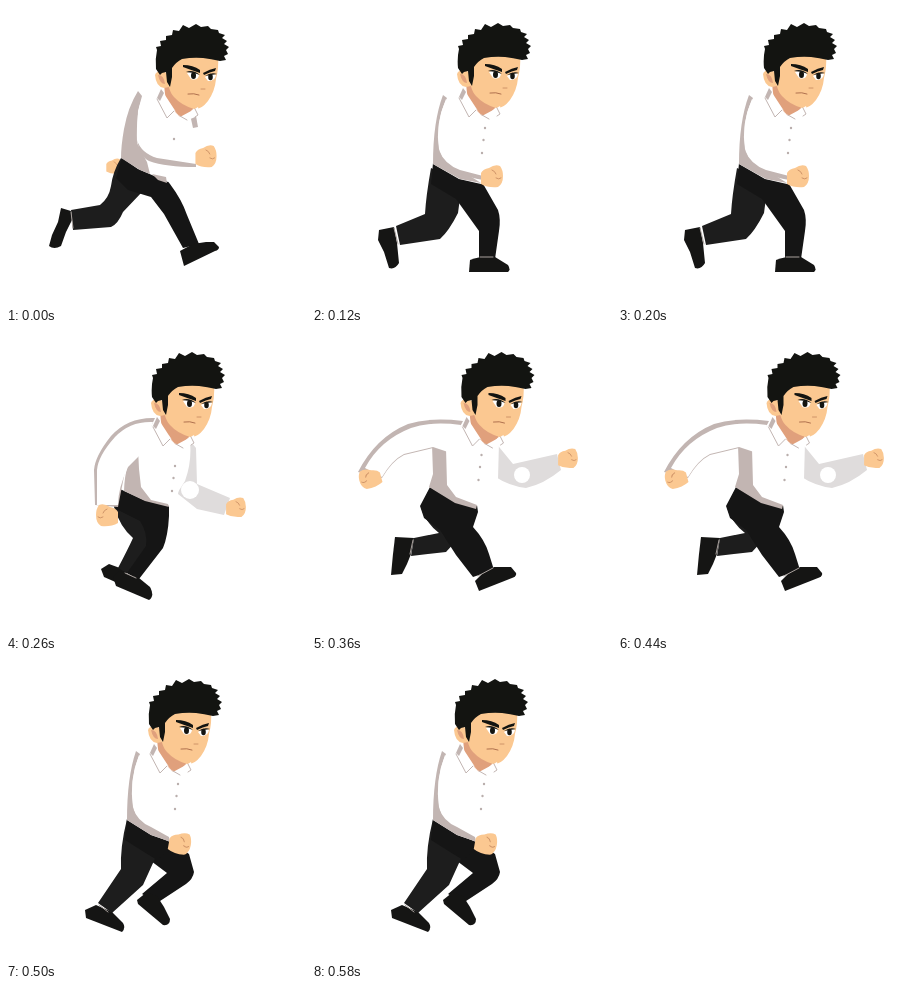
An HTML page that plays this animation: 300 px wide and 300 px high, repeating every 0.64 s.

```html
<!DOCTYPE html>
<html lang="en">
<head>
<meta charset="utf-8">
<title>Running man</title>
<style>
  html, body { margin: 0; width: 100%; height: 100%; overflow: hidden; background: #fff; }
  #strip { display: block; width: 1500px; height: 300px; animation: run 640ms step-end infinite; }
  @keyframes run {
    0% { transform: translateX(0); }
    18.75% { transform: translateX(-300px); }
    40.625% { transform: translateX(-600px); }
    56.25% { transform: translateX(-900px); }
    78.125% { transform: translateX(-1200px); }
  }
  .skin { fill: #fbc891; }
  .tan { fill: #e0a07c; }
  .hair { fill: #131411; }
  .shirt { fill: #fff; }
  .shade { fill: #c2b5b2; }
  .sleeve { fill: #dfdcdc; }
  .leg { fill: #151515; }
  .far { fill: #1d1d1d; }
  .shoe { fill: #151514; }
  .cuff { stroke: #a9a19d; }
  .line { stroke: #cf9468; }
  .fold { stroke: #c2b5b2; }
  .cuff, .line, .fold { fill: none; stroke-width: 1; stroke-linecap: round; }
</style>
</head>
<body>
<svg id="strip" viewBox="0 0 1500 300">
  <defs>
    <g id="head">
      <path class="tan" d="M154 78L156 95L170 110Q178 108 183 102L178 88Z"/>
      <path class="skin" d="M157 62L164 46L208 49Q209 61 206 72Q205 84 198 94Q191 103 184 102Q171 98 164 90Q157 83 157 62Z"/>
      <path class="tan" d="M158 80Q160 90 168 96Q176 101 184 102L174 103Q160 95 158 80Z"/>
      <path class="skin" d="M157 66Q148 61 145 68Q146 80 154 81L159 80Z"/>
      <path class="tan" d="M148 68Q154 68 155 77Q150 77 148 68Z"/>
      <path class="hair" d="M150 68L146 62Q145 52 147 43L146 40L151 39L150 34L156 33L156 29L162 28L163 23L169 24L173 18L179 21L186 17L191 20L198 19L201 22L208 23L209 26L215 28L212 31L217 34L214 37L219 40L216 43L218 47L214 49L216 53L210 54Q201 52 193 51Q183 50 172 52Q166 55 162 61L162 70L160 80L157 75L156 65L152 66Z"/>
      <path class="hair" d="M173 58Q183 58 190 63L190 66Q181 63 173 60ZM193 66Q200 62 206 61L205 64Q200 65 194 68Z"/>
      <path fill="#fff" d="M177 66Q184 62 189 68Q188 74 181 72ZM195 70Q201 65 206 68Q205 74 198 74Z"/>
      <path class="hair" d="M176 65Q183 62 190 68L184 66ZM195 69Q201 65 207 67L201 68Z"/>
      <ellipse class="hair" cx="183.500" cy="68.500" rx="2.500" ry="3.500"/>
      <ellipse class="hair" cx="200.500" cy="70" rx="2.300" ry="3.300"/>
      <path class="line" d="M191 82L195 82"/>
      <path class="line" d="M178 87Q184 86 189 88" style="stroke:#b0714e"/>
    </g>
    <g id="collar">
      <path class="shirt" d="M151 82L146 90L158 112L165 104L170 110L183 103L188 100L190 108L178 113L168 108Z"/>
      <path class="fold" d="M147 92L157 111L164 104M170 109L177 113M185 102L188 108L185 110"/>
      <path class="shade" d="M151 82L147 91L150 94L154 86Z"/>
    </g>
    <g id="buttons" fill="#b9aeac">
      <circle cx="173" cy="122" r="1.200"/>
      <circle cx="171.500" cy="134" r="1.200"/>
      <circle cx="170" cy="147" r="1.200"/>
    </g>
    <g id="fist">
      <path class="skin" d="M-11 -3Q-9 -7 -3 -8Q3 -12 8 -10Q11 -6 11 0Q11 8 6 11Q-4 12 -11 8Z"/>
      <path class="line" d="M0 -6Q3 -5 4 -2M4 2Q7 4 9 2"/>
    </g>
  </defs>

  <svg width="300" height="300">
    <use href="#fist" transform="translate(108 160) scale(.7)"/>
    <path class="far" d="M115 152Q107 165 105 180Q103 192 94 199L65 204L67 224L105 221Q112 218 117 206L136 186L132 162Z"/>
    <path class="shoe" d="M55 202L65 205L66 214L60 226L55 240Q48 244 43 240L46 229L52 216Z"/>
    <path class="cuff" d="M65 206L67 222"/>
    <path class="leg" d="M116 151L131 160L160 173L164 178Q176 194 181 209L193 238L177 242L158 208L145 191L122 184L110 172Z"/>
    <path class="shoe" d="M174 245L187 238L200 236L208 236L213 241Q213 244 209 245L178 260Z"/>
    <path class="shirt" d="M132 86L153 81L182 105L192 108Q195 130 185 150L162 176L132 163L116 152Q116 118 132 86Z"/>
    <path class="shade" d="M132 85Q122 101 118 123Q115 140 115 152L134 164L144 168L141 156L135 145L131 132L132 105L136 90Z"/>
    <path class="shade" d="M146 168L160 171L161 177L152 174Z"/>
    <path class="shade" d="M183 104L190 110L192 121L187 122Z"/>
    <path class="shirt" d="M136 93Q130 105 131 137Q135 148 150 154L190 160L190 143L158 137L155 112Z"/>
    <path class="shade" d="M131 134Q135 147 151 152L190 158L190 161Q160 161 143 155Q134 151 131 134Z"/>
    <use href="#fist" transform="translate(200 150) scale(.96 1)"/>
    <use href="#head" x="4" y="1"/>
    <use href="#collar" x="4" y="1"/>
    <circle cx="168" cy="133" r="1.200" fill="#b9aeac"/>
  </svg>

  <svg x="300" width="300" height="300">
    <path class="far" d="M119 162Q114 190 113 208L84 220L88 239L128 233Q137 225 146 207L150 177Z"/>
    <path class="shoe" d="M67 224L82 221L85 237L87 257Q83 264 77 262L72 246L66 234Z"/>
    <path class="cuff" d="M82 222L86 238"/>
    <path class="leg" d="M121 157L170 176L186 204Q189 213 187 225L183 253L167 253L167 225L144 193L119 178Z"/>
    <path class="shoe" d="M157 266L158 254Q170 249 183 251L196 259Q199 264 196 266Z"/>
    <path class="cuff" d="M168 251H181"/>
    <path class="shirt" d="M131 89L150 81L182 105L189 108Q192 137 187 164L169 178L147 173L121 158Q119 117 131 89Z"/>
    <path class="shade" d="M131 89Q121 115 121 158L148 173L169 177L158 170L137 159L127 140Q124 114 135 92Z"/>
    <path class="shirt" d="M134 93Q123 118 127 143Q130 158 148 165L170 172L176 158L154 146L152 115Z"/>
    <path class="shade" d="M127 144Q132 158 148 164L171 170L171 174Q144 169 134 161Q128 156 127 144Z"/>
    <use href="#fist" x="180" y="170"/>
    <use href="#head"/>
    <use href="#collar"/>
    <use href="#buttons"/>
  </svg>

  <svg x="600" width="300" height="300">
    <path class="sleeve" d="M182 104L190 114L191 150L224 164L218 181L191 175L172 160Z"/>
    <circle class="shirt" cx="184" cy="156" r="9"/>
    <use href="#fist" transform="translate(230 173) scale(.9)"/>
    <path class="shoe" d="M95 235L103 230L122 237L114 250L98 243Z"/>
    <path class="far" d="M114 155L108 173Q114 193 127 204Q122 215 112 234L128 243L148 216L155 178Z"/>
    <path class="leg" d="M114 155L163 171L163 182Q162 202 157 214L133 245L121 239L140 212Q142 199 134 187L110 175Z"/>
    <path class="shoe" d="M107 243L113 237L133 244L144 253Q149 262 143 266L110 252Z"/>
    <path class="cuff" d="M119 239L130 244"/>
    <path class="shirt" d="M138 87L151 81L182 105L184 108Q186 128 179 147L163 172L138 166L114 155L131 115Z"/>
    <path class="shade" d="M132 114Q119 126 118 157L139 167L163 173L162 170L145 166L135 153L133 135Z"/>
    <path class="shade" d="M149 84Q122 83 105 102Q89 122 88 136L89 171L112 173L120 132L134 116Z"/>
    <path class="shirt" d="M147 88Q124 87 109 103Q92 122 91 136L91 171L112 171Q112 154 122 133L137 118Z"/>
    <use href="#fist" transform="translate(101 181) scale(-1 1)"/>
    <use href="#head" y="1"/>
    <use href="#collar" y="1"/>
    <use href="#buttons" x="-4" y="10"/>
  </svg>

  <svg x="900" width="300" height="300">
    <path class="sleeve" d="M183 108L201 130L245 120L249 136Q232 150 214 154Q197 152 182 142Z"/>
    <circle class="shirt" cx="210" cy="141" r="8"/>
    <use href="#fist" transform="translate(256 124) scale(.9)"/>
    <path class="far" d="M116 158L109 173Q113 188 127 199L102 204L99 222L134 218L145 206L148 177Z"/>
    <path class="shoe" d="M83 203L102 204L99 220L95 230L90 240L79 241L81 220Z"/>
    <path class="cuff" d="M101 206L98 220"/>
    <path class="leg" d="M118 153L165 171L166 178L161 193Q173 206 177 220L182 236L161 243L144 221L128 196L112 184L108 172Z"/>
    <path class="shoe" d="M163 247L170 240L182 233L199 233L204 239Q205 242 200 244L167 257Z"/>
    <path class="cuff" d="M166 242L181 234"/>
    <path class="shirt" d="M139 86L154 81L185 105L187 108L186 145L165 172L143 168L118 153L121 112Z"/>
    <path class="shade" d="M120 111L134 114L135 151L144 163L165 171L164 175L143 169L117 153L121 140Z"/>
    <path class="shade" d="M151 87Q118 83 96 90Q64 103 46 138L70 144Q80 127 92 121L121 114L136 116Z"/>
    <path class="shirt" d="M149 91Q119 87 99 94Q68 106 53 134L70 143Q80 126 92 120L121 113L142 120Z"/>
    <use href="#fist" transform="translate(58 144) rotate(-15) scale(-1 .9)"/>
    <use href="#head" x="3.500" y="1"/>
    <use href="#collar" x="3.500" y="1"/>
    <use href="#buttons" x="-3.500" y="-1"/>
  </svg>

  <svg x="1200" width="300" height="300">
    <path class="leg" d="M148 175L166 180L183 192L188 210Q187 217 180 222L151 241L136 232L161 211L145 199Z"/>
    <path class="shoe" d="M131 238L141 230L151 234L158 245L164 257Q164 264 157 263L132 242Z"/>
    <path class="far" d="M121 157L149 170L152 190L137 223L106 251L92 241L115 207Q114 185 121 157Z"/>
    <path class="leg" d="M121 157L167 178L162 190L151 198L138 190L119 178Z"/>
    <path class="shoe" d="M79 248L90 243L106 250L117 261Q120 266 116 270L80 256Z"/>
    <path class="cuff" d="M93 243L102 250"/>
    <path class="shirt" d="M130 89L147 81L179 105L187 108Q191 138 184 168L165 180L145 173L121 158Q119 117 130 89Z"/>
    <path class="shade" d="M130 89Q121 115 121 158L145 173L166 180L161 174L137 162L127 143Q124 114 134 92Z"/>
    <path class="shirt" d="M133 93Q123 118 127 145Q130 160 145 167L164 180L172 166L153 150L151 115Z"/>
    <path class="shade" d="M127 146Q131 159 145 165L163 175L164 180Q142 171 133 163Q127 157 127 146Z"/>
    <use href="#fist" transform="translate(174 181) rotate(10)"/>
    <use href="#head" x="-3"/>
    <use href="#collar" x="-3"/>
    <use href="#buttons" x="-1"/>
  </svg>
</svg>
</body>
</html>
```
